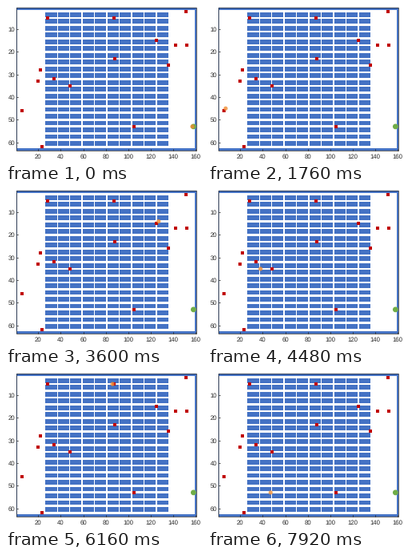
These frames come from a looping animation (245 by 194 pixels, 8 s). A matplotlib script:

```python
import numpy as np
import matplotlib.pyplot as plt
from matplotlib.animation import FuncAnimation
from matplotlib.patches import Circle, Rectangle

W, H, DPI = 245, 194, 100
COLS, ROWS = 160, 63
LEFT, TOP, CW, CH = 12.9, 2.3, 1.406, 2.83
FRAMES, STEP = 100, 10

BLUE, RED, GREEN, ORANGE = "#4472c4", "#c00000", "#70ad47", "#f08c32"
INK = "#262626"

ITEMS = [(28, 5), (87, 5), (151, 2), (125, 15), (142, 17), (152, 17),
         (22, 28), (88, 23), (136, 26), (20, 33), (34, 32), (48, 35),
         (5.5, 46), (105, 53), (23.5, 62)]
DEPOT = (158, 53)

# Stops of the walk: x, y and how many cells of travel the walker waits there.
STOPS = [(157, 53, 1), (125, 15, 1), (6, 45, 1), (26, 17, 1), (152, 17, 0),
         (151, 2, 1), (151, 14, 0), (127, 14, 0), (48, 35, 0), (6, 46, 0),
         (20, 33, 10), (34, 32, 11), (22, 30, 0), (28, 5, 1), (87, 5, 3),
         (151, 17, 0), (105, 53, 0), (30, 53, 0)]

plt.rcParams.update({"font.family": "Liberation Sans", "text.hinting": "none"})
fig = plt.figure(figsize=(W / DPI, H / DPI), dpi=DPI, facecolor="white")
ax = fig.add_axes([0, 0, 1, 1])
ax.set_xlim(0, W)
ax.set_ylim(H, 0)
ax.axis("off")


def px(x):
    return LEFT + (x - 0.5) * CW


def py(y):
    return TOP + (y - 0.5) * CH


def block(x, y, w, h):
    """Fill w by h grid cells whose first cell is (x, y)."""
    ax.add_patch(Rectangle((px(x - 0.5), py(y - 0.5)), w * CW, h * CH,
                           fc=BLUE, lw=0))


def draw_floor():
    for x, y, w, h in [(1, 1, COLS, 1), (1, ROWS, COLS, 1),
                       (1, 1, 1, ROWS), (COLS, 1, 1, ROWS)]:
        block(x, y, w, h)
    for x in range(27, 136, 11):
        for y in range(3, 62, 3):
            block(x, y, 10, 2)


def draw_axes():
    bottom = TOP + ROWS * CH
    ax.add_patch(Rectangle((LEFT, TOP), COLS * CW, ROWS * CH,
                           fill=False, ec=INK, lw=0.5, zorder=2))
    tick = dict(color=INK, lw=0.5, zorder=2)
    font = dict(color=INK, fontsize=5.6, va="center_baseline")
    for v in range(20, COLS + 1, 20):
        ax.plot([px(v)] * 2, [bottom, bottom - 2], **tick)
        ax.text(px(v), 188.5, str(v), ha="center", **font)
    for v in range(10, ROWS, 10):
        ax.plot([LEFT, LEFT + 2], [py(v)] * 2, **tick)
        ax.text(11, py(v), str(v), ha="right", **font)


def is_free(x, y):
    in_racks = 27 <= x <= 135 and 3 <= y <= 61
    return not in_racks or y % 3 == 2 or (x - 26) % 11 == 0


def backward(a, b):
    s = 1 if b >= a else -1
    return range(b, a - s, -s)


def walk(a, b):
    """Cells from a to b along the aisles, staying near the straight line."""
    (ax_, ay), (bx, by) = a, b
    dx, dy = bx - ax_, by - ay
    sx, sy = int(np.sign(dx)), int(np.sign(dy))
    open_cells = {b}
    for x in backward(ax_, bx):
        for y in backward(ay, by):
            onward = {(x + sx, y), (x, y + sy)}
            if is_free(x, y) and onward & open_cells:
                open_cells.add((x, y))

    def off_line(cell):
        return abs((cell[0] - ax_) * dy - (cell[1] - ay) * dx)

    cells, here = [], a
    while here != b:
        x, y = here
        moves = [c for c in [(x + sx, y), (x, y + sy)]
                 if c != here and c in open_cells]
        here = min(moves, key=off_line)
        cells.append(here)
    return cells


def build_path():
    x, y, wait = STOPS[0]
    path = [(x, y)] * (1 + wait)
    for x, y, wait in STOPS[1:]:
        path += walk(path[-1], (x, y)) + [(x, y)] * wait
    return path


draw_floor()
draw_axes()
for x, y in ITEMS:
    ax.add_patch(Rectangle((px(x) - 2, py(y) - 2), 4, 4,
                           fc=RED, lw=0, zorder=3))
ax.add_patch(Circle((px(DEPOT[0]), py(DEPOT[1])), 3.4, fc=GREEN, lw=0, zorder=3))
walker = ax.add_patch(Circle((0, 0), 2.6, fc=ORANGE, alpha=0.8, lw=0, zorder=4))
PATH = build_path()


def update(i):
    x, y = PATH[i * STEP]
    walker.center = px(x), py(y)
    return walker,


anim = FuncAnimation(fig, update, frames=FRAMES, interval=80,
                     repeat=True, repeat_delay=0, blit=False)
plt.show()
```
